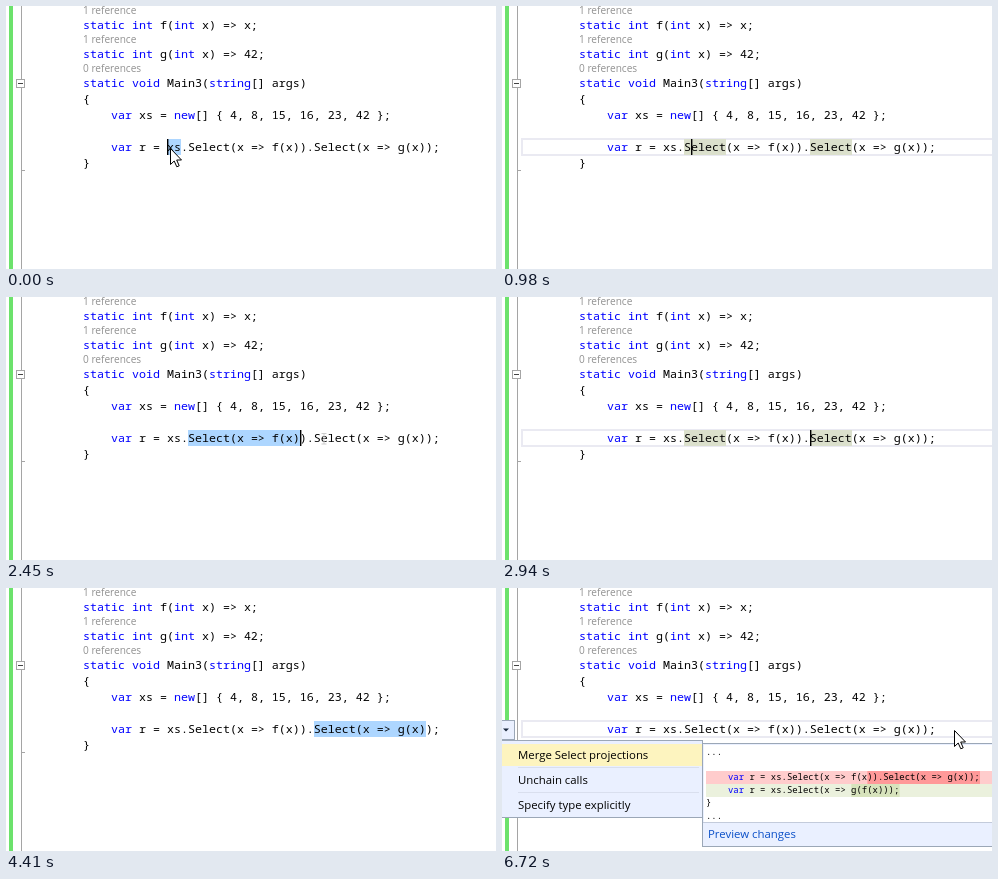
Write an HTML page that moves like this. It is 490 px wide and 263 px high and loops after 8 s.

```html
<!DOCTYPE html>
<html lang="en">
<head>
<meta charset="utf-8">
<title>Merge Select projections</title>
<style>
  html, body { margin: 0; width: 100%; height: 100%; overflow: hidden; background: #fff; }
  svg { display: block; width: 490px; height: 263px; }
  text { white-space: pre; }
  .code { font: 11.667px "Noto Sans Mono", monospace; }
  .small { font: 500 8.94px "Noto Sans Mono", monospace; }
  .lens { font: 10.1px "Open Sans", sans-serif; fill: #919191; }
  .menu { font: 11.4px "Open Sans", sans-serif; }
  .k { fill: #00f; }
  .ref { fill: #dbe0cc; }
  .pane { fill: #eaf0ff; stroke: #9ba7b7; }
  .link { fill: #0a4fc8; }

  .anim, .editing { animation: 8s step-end infinite; }
  .editing { --from: 175px; --to: 161px; animation-name: edit; }
  .selection {
    x: min(var(--from), var(--to));
    width: max(var(--to) - var(--from), var(--from) - var(--to));
    fill: #39f; fill-opacity: .4;
  }
  .caret { x: var(--to); animation-name: blink; }
  .line { animation-name: line; }
  .xs-refs { animation-name: xs-refs; }
  .select-refs { animation-name: select-refs; }
  .pointer { animation-name: pointer; }
  .beam { animation-name: beam; }
  .actions { animation-name: actions; }
  .preview { animation-name: preview; }

  /* selection anchor and moving end */
  @keyframes edit {
    0% { --from: 175px; --to: 161px; }
    7% { --from: 189px; --to: 189px; }
    14.875% { --from: 182px; --to: 189px; }
    15.75% { --to: 196px; }
    16.625% { --to: 203px; }
    17.5% { --to: 217px; }
    18.375% { --to: 231px; }
    19.25% { --to: 252px; }
    20.125% { --to: 266px; }
    21% { --to: 280px; }
    21.875% { --to: 294px; }
    23.625% { --to: 301px; }
    24.5% { --to: 294px; }
    32.375% { --from: 308px; --to: 308px; }
    40.25% { --to: 322px; }
    41.125% { --to: 343px; }
    42% { --to: 364px; }
    42.875% { --to: 378px; }
    43.75% { --to: 399px; }
    47.25% { --to: 406px; }
    48.125% { --to: 413px; }
    49% { --to: 420px; }
    59.5%, 100% { --from: 434px; --to: 434px; }
  }
  @keyframes blink {
    0% { opacity: 1; }
    38.5% { opacity: 0; }
    50.75% { opacity: 1; }
    55.125% { opacity: 0; }
    66.5% { opacity: 1; }
    72.625% { opacity: 0; }
    78.75% { opacity: 1; }
    79.625%, 100% { opacity: 0; }
  }
  @keyframes line {
    0%, 14.875%, 40.25% { opacity: 0; }
    7%, 32.375%, 59.5%, 100% { opacity: 1; }
  }
  @keyframes xs-refs {
    0%, 9.625%, 100% { opacity: 0; }
    1.75% { opacity: 1; }
  }
  @keyframes select-refs {
    0%, 21%, 45.5%, 100% { opacity: 0; }
    10.5%, 35.875% { opacity: 1; }
  }
  @keyframes pointer {
    0% { transform: translate(164px, 142px); opacity: 1; }
    .875% { transform: translate(170px, 142px); opacity: 1; }
    1.75% { transform: translate(179px, 142px); opacity: 1; }
    2.625% { transform: translate(452px, 142px); opacity: 0; }
    79.625%, 100% { transform: translate(452px, 142px); opacity: 1; }
  }
  @keyframes beam {
    0%, 32.375%, 100% { opacity: 0; }
    28.875% { opacity: 1; }
  }
  @keyframes actions {
    0% { opacity: 0; }
    79.625%, 100% { opacity: 1; }
  }
  @keyframes preview {
    0% { opacity: 0; }
    84%, 100% { opacity: 1; }
  }
</style>
</head>
<body>
<svg viewBox="0 0 490 263">
  <!-- margin -->
  <rect x="3" width="4" height="263" fill="#6ce26c"/>
  <g fill="none" stroke="#a5a5a5">
    <path d="M15.5 0V263M15 164.5H19"/>
    <rect x="10.5" y="73.5" width="8" height="8" fill="#fff"/>
    <path d="M12 77.5H17" stroke="#444"/>
  </g>

  <!-- highlights -->
  <rect class="anim line" x="20" y="133" width="480" height="16" fill="none" stroke="#eaeaf2" stroke-width="2"/>
  <g class="anim xs-refs ref">
    <rect x="133" y="101" width="14" height="16"/>
    <rect x="161" y="133" width="14" height="16"/>
  </g>
  <g class="anim select-refs ref">
    <rect x="182" y="133" width="42" height="16"/>
    <rect x="308" y="133" width="42" height="16"/>
  </g>
  <g class="editing">
    <rect class="selection" y="133" height="16"/>
    <rect class="anim caret" y="133" width="1.4" height="16"/>
  </g>

  <g class="lens">
    <text x="77" y="8">1 reference</text>
    <text x="77" y="37">1 reference</text>
    <text x="77" y="66">0 references</text>
  </g>
  <g class="code">
    <text x="77" y="23"><tspan class="k">static int</tspan> f(<tspan class="k">int</tspan> x) =&gt; x;</text>
    <text x="77" y="52"><tspan class="k">static int</tspan> g(<tspan class="k">int</tspan> x) =&gt; 42;</text>
    <text x="77" y="81"><tspan class="k">static void</tspan> Main3(<tspan class="k">string</tspan>[] args)</text>
    <text x="77" y="97">{</text>
    <text x="105" y="113"><tspan class="k">var</tspan> xs = <tspan class="k">new</tspan>[] { 4, 8, 15, 16, 23, 42 };</text>
    <text x="105" y="145"><tspan class="k">var</tspan> r = xs.Select(x =&gt; f(x)).Select(x =&gt; g(x));</text>
    <text x="77" y="161">}</text>
  </g>
  <path class="anim beam" d="M315.5 136.5H320.5M318 136.5V147M315.5 147H320.5" fill="none" stroke="#ccc"/>

  <!-- quick actions -->
  <g class="anim actions">
    <rect class="pane" x="-8.5" y="132.5" width="21" height="19"/>
    <path d="M1 140.5H7L4 143.5Z" fill="#1b293e"/>
    <rect class="pane" x="-1.5" y="152.5" width="202" height="77"/>
    <rect y="156" width="200" height="22" fill="#fdf4bf"/>
    <path d="M16 179.5H197M16 204.5H197" stroke="#d9dfee"/>
    <g class="menu">
      <text x="16" y="171">Merge Select projections</text>
      <text x="16" y="196">Unchain calls</text>
      <text x="16" y="221">Specify type explicitly</text>
    </g>
  </g>

  <!-- change preview -->
  <g class="anim preview">
    <rect class="pane" x="200.5" y="155.5" width="292" height="103"/>
    <rect x="202" y="157" width="288" height="77" fill="#fff"/>
    <path d="M201 234.5H490" stroke="#c3cbdb"/>
    <rect x="204" y="183" width="286" height="13" fill="#fcc"/>
    <rect x="365.4" y="183" width="112.6" height="13" fill="#f99"/>
    <rect x="204" y="196" width="286" height="13" fill="#ebf1dd"/>
    <rect x="349.3" y="196" width="48.3" height="13" fill="#d7e3bc"/>
    <g class="small">
      <text x="204" y="167">...</text>
      <text x="226" y="192"><tspan class="k">var</tspan> r = xs.Select(x =&gt; f(x)).Select(x =&gt; g(x));</text>
      <text x="226" y="205"><tspan class="k">var</tspan> r = xs.Select(x =&gt; g(f(x)));</text>
      <text x="204" y="218">}</text>
      <text x="204" y="231">...</text>
    </g>
    <text class="menu link" x="206" y="250">Preview changes</text>
  </g>

  <path class="anim pointer" d="M.5 .5V16.5L4.2 13L6.8 18.8L9.2 17.8L6.7 12H11.5Z" fill="#fff" stroke="#000"/>
</svg>
</body>
</html>
```
